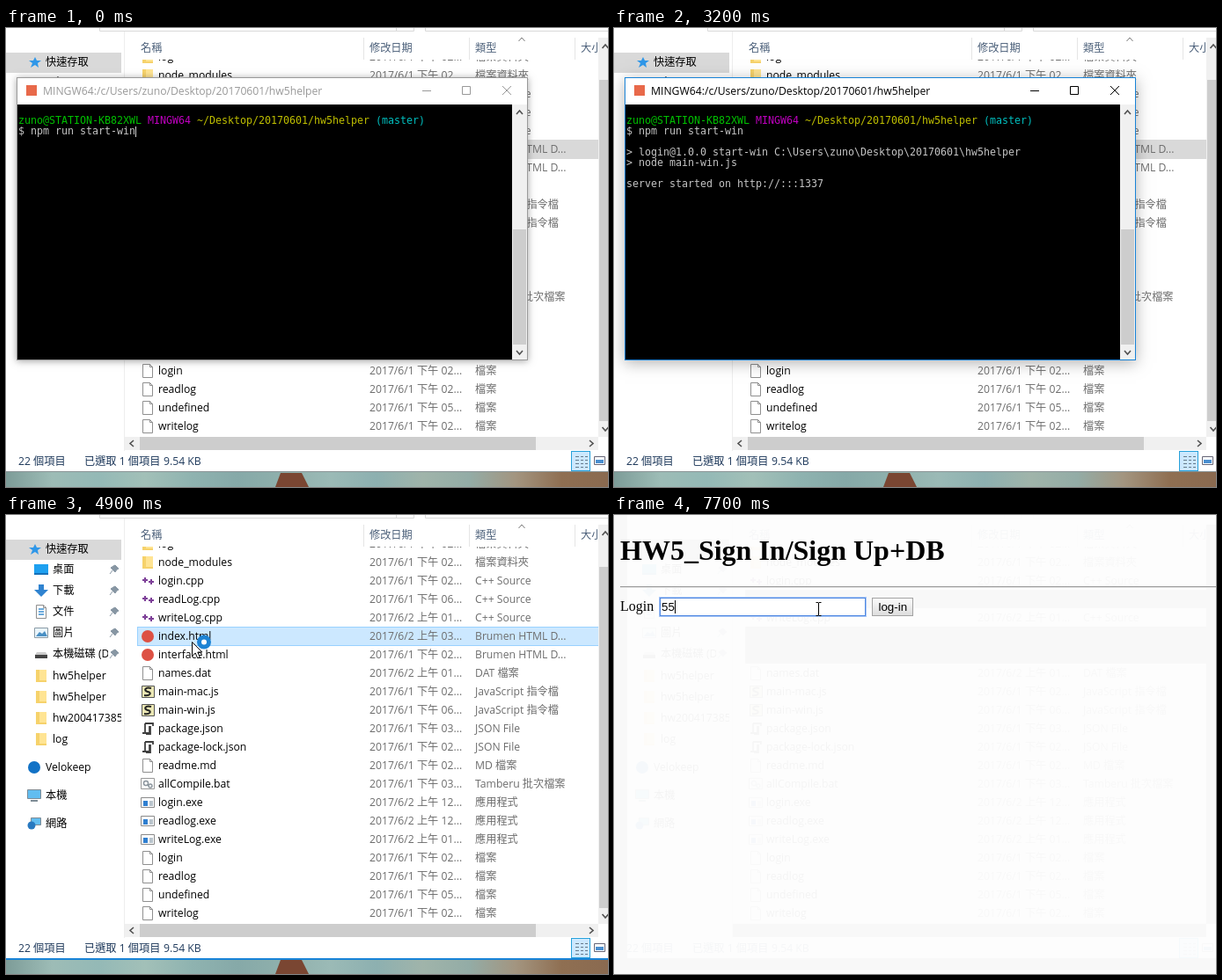
An HTML page with a canvas that plays this animation: 684x522 px, repeating every 8000 ms.

```html
<!DOCTYPE html>
<html lang="zh-Hant">
<head>
<meta charset="utf-8">
<style>
html, body { margin: 0; width: 100%; height: 100%; overflow: hidden; background: #fff; }
canvas { display: block; }
</style>
</head>
<body>
<canvas id="stage" width="684" height="522"></canvas>
<script>
const ctx = document.getElementById('stage').getContext('2d');
const LOOP = 8000, W = 684, H = 522;
const UI = '12.2px "Open Sans", "Noto Sans CJK TC", sans-serif';
const MONO = '11.63px "DejaVu Sans Mono", monospace';
const SANS = '13.33px "Liberation Sans", sans-serif';

const TYPES = {
  dir: '檔案資料夾', cpp: 'C++ Source', html: 'Brumen HTML D...', dat: 'DAT 檔案',
  js: 'JavaScript 指令檔', json: 'JSON File', md: 'MD 檔案',
  bat: 'Tamberu 批次檔案', exe: '應用程式', file: '檔案'
};
// name, a(m) or p(m) with the hour, type
const FILES = `log p02 dir|node_modules p02 dir|login.cpp p02 cpp|readLog.cpp p06 cpp
|writeLog.cpp a01 cpp|index.html a03 html|interface.html p02 html|names.dat a01 dat
|main-mac.js p02 js|main-win.js p06 js|package.json p03 json|package-lock.json p02 json
|readme.md p02 md|allCompile.bat p03 bat|login.exe a12 exe|readlog.exe a12 exe
|writeLog.exe a01 exe|login p02 file|readlog p02 file|undefined p05 file|writelog p02 file`
  .split('|').map(row => row.trim().split(' '));
const SELECTED = 5;

// time, x, y of the pointer's hot spot
const POINTER = [
  [200, 550, 130], [500, 372, 213], [1700, 372, 213], [1800, 366, 200], [2000, 366, 200],
  [2300, 560, 140], [2600, 640, 10], [2700, 645, -30], [3600, 400, -30], [3700, 400, -10],
  [3800, 352, 55], [3900, 300, 90], [4000, 300, 90], [4100, 270, 108], [4200, 240, 163],
  [4500, 211, 144], [5400, 211, 144], [5800, 396, -2], [5900, 430, -30], [6100, 440, -30],
  [6200, 429, 2], [6500, 232, 107], [LOOP, 232, 107]
];

function rect(color, x, y, w, h) {
  ctx.fillStyle = color;
  ctx.fillRect(x, y, w, h);
}
function frame(color, x, y, w, h) {
  ctx.strokeStyle = color;
  ctx.lineWidth = 1;
  ctx.strokeRect(x + .5, y + .5, w - 1, h - 1);
}
function text(s, x, y, color = '#000', font = UI) {
  ctx.font = font;
  ctx.fillStyle = color;
  ctx.fillText(s, x, y);
}
// SVG path at an offset, filled and/or stroked
function path(d, x, y, fill, stroke, width = 1) {
  ctx.save();
  ctx.translate(x, y);
  const p = new Path2D(d);
  if (fill) { ctx.fillStyle = fill; ctx.fill(p); }
  if (stroke) { ctx.strokeStyle = stroke; ctx.lineWidth = width; ctx.stroke(p); }
  ctx.restore();
}
function disc(color, x, y, r) {
  ctx.fillStyle = color;
  ctx.beginPath();
  ctx.arc(x, y, r, 0, 7);
  ctx.fill();
}
function clipped(x, y, w, h, draw) {
  ctx.save();
  ctx.beginPath();
  ctx.rect(x, y, w, h);
  ctx.clip();
  draw();
  ctx.restore();
}
function gradient(x, y, colors) {
  const g = ctx.createLinearGradient(0, 0, x, y);
  colors.forEach((c, i) => g.addColorStop(i / (colors.length - 1), c));
  return g;
}
function chevron(x, y, dx, dy, color = '#505050', width = 1.6) {
  const d = dx ? `M${-2 * dx} -3.5L${2 * dx} 0L${-2 * dx} 3.5` : `M-3.5 ${-2 * dy}L0 ${2 * dy}L3.5 ${-2 * dy}`;
  path(d, x, y, null, color, width);
}

// Icons are drawn around their centre
const ICONS = {
  dir(x, y) {
    rect('#ffe493', x - 6, y - 7, 12, 14);
    path('M-6 -7h4v12l-4 2zM-2 5h8v2h-12z', x, y, '#f6d26b');
  },
  cpp(x, y) {
    path('M-6 -1h6M-3 -4v6M1 1h6M4 -2v6', x, y, null, '#7d3f98', 2);
  },
  html(x, y) { disc('#dd5144', x, y, 7); },
  file(x, y) {
    path('M-5.5 -7.5h8l3 3v12h-11z M2.5 -7.5v3h3', x, y, '#fff', '#8f8f8f');
  },
  js(x, y) {
    path('M-6.5 -6.5h14v13h-14z', x, y, '#ebe7b4', '#555');
    path('M4 -4C-3 -6 -5 -1 0 0S3 5 -4 4', x, y, null, '#222', 2);
  },
  json(x, y) {
    path('M-3 -6h9v3M-3 -6v11h-3M-6 5h8v-8M-2 6h5v-9', x, y, null, '#3f3f3f', 1.8);
  },
  bat(x, y) {
    path('M-7.5 -6.5h15v12h-15z', x, y, '#fafafa', '#999');
    path('M-4.5 -1a2.5 2.5 0 1 0 5 0a2.5 2.5 0 1 0 -5 0M1 2a2 2 0 1 0 4 0a2 2 0 1 0 -4 0', x, y, null, '#8a949c', 1.4);
  },
  exe(x, y) {
    path('M-7.5 -5.5h15v11h-15z', x, y, '#fff', '#8a8a8a');
    rect('#2f7fd0', x - 5, y - 2, 5, 6);
    rect('#b9c4cc', x + 2, y - 2, 4, 6);
  },
  star(x, y) {
    path('M0 -6L2 -2L7 -2L3 1L4 6L0 3L-5 6L-3 1L-7 -2L-2 -2z', x, y, '#2f97e8');
  },
  desk(x, y) { rect('#1ea0f0', x - 8, y - 6, 16, 10); rect('#1670b8', x - 8, y + 4, 16, 2); },
  down(x, y) { path('M-3 -7h6v6h5l-8 8l-8 -8h5z', x, y, '#2f83d0'); },
  doc(x, y) {
    ICONS.file(x, y);
    path('M-3 -3h6M-3 0h6M-3 3h6', x, y, null, '#3b8fd0', 1.4);
  },
  pic(x, y) {
    path('M-7.5 -5.5h15v11h-15z', x, y, '#eaf5fc', '#8a9aa5');
    path('M-6 4l4 -5l3 2l3 -3l3 6z', x, y, '#4a90c4');
  },
  disk(x, y) { path('M-5 -2h10l2 3h-14z', x, y, '#ccc'); rect('#444', x - 7, y + 1, 14, 4); },
  cloud(x, y) { disc('#1272c6', x, y, 7); },
  pc(x, y) {
    path('M-7.5 -6.5h15v10h-15z', x, y, '#62bdf0', '#7d8b95');
    rect('#7d8b95', x - 4, y + 5, 8, 2);
  },
  net(x, y) {
    path('M-3.5 -6.5h11v8h-11z', x, y, '#62bdf0', '#7d8b95');
    disc('#2879c0', x - 3, y + 2, 4.5);
  }
};
ICONS.dat = ICONS.md = ICONS.file;

const SIDEBAR = [
  ['desk', '桌面', 62], ['down', '下載', 86], ['doc', '文件', 110], ['pic', '圖片', 134],
  ['disk', '本機磁碟 (D', 158], ['dir', 'hw5helper', 183], ['dir', 'hw5helper', 207],
  ['dir', 'hw200417385', 231], ['dir', 'log', 255]
];
const PLACES = [['cloud', 'Velokeep', 287], ['pc', '本機', 319], ['net', '網路', 351]];

function sidebar() {
  rect('#d9d9d9', 0, 28, 131, 23);
  ICONS.star(33, 39);
  text('快速存取', 45, 43);
  SIDEBAR.forEach(([icon, label, y], i) => {
    ICONS[icon](40, y);
    text(label, 53, y + 4);
    if (i < 5) {
      rect('#fff', 116, y - 8, 15, 16);
      path('M1 -5l4 4l-2 1l-2 3l-5 -5l3 -2zM-2 1l-3 4', 123, y, '#8796a3', '#8796a3');
    }
  });
  for (const [icon, label, y] of PLACES) {
    ICONS[icon](32, y);
    text(label, 45, y + 4);
  }
}

// Rows run on past the right edge of the view
function fileList(focused, hover) {
  FILES.forEach(([name, when, type], i) => {
    const y = 33 + i * 21, am = when[0] === 'a';
    if (i === SELECTED) {
      rect(focused ? '#cce8ff' : '#d9d9d9', 149, y - 11, 600, 22);
      if (focused) frame('#99d1ff', 149, y - 11, 600, 22);
    } else if (i === hover) rect('#e5f3ff', 149, y - 10, 600, 21);
    ICONS[type](161, y);
    text(name, 173, y + 4);
    text(`2017/6/${am ? 2 : 1} ${am ? '上午' : '下午'} ${when.slice(1)}...`, 413, y + 4, '#6d6d6d');
    text(TYPES[type], 533, y + 4, '#6d6d6d');
  });
}

function wallpaper() {
  rect(gradient(W, 0, ['#7d9c98', '#9dbcb6', '#94b9b6', '#a2c0b8', '#8fb3b0', '#86a9a8', '#8fb0ac',
    '#9bbab6', '#8db0b0', '#a0b4aa', '#93aca6', '#a39580', '#8f6f52', '#8a6a50']), 0, 504, W, 18);
  path('M312 506h24l8 16h-38z', 0, 0, '#7a4632');
}

function explorer(focused, hover) {
  rect('#fff', 0, 0, W, H);
  path('M106.5 0v3.5h357V0M443.5 0v3M476.5 0v3.5H684', 0, 0, null, '#d9d9d9');
  clipped(0, 0, 131, 480, sidebar);
  rect('#ededed', 134, 4, 1, 477);
  clipped(135, 36, 538, 429, () => fileList(focused, hover));
  clipped(135, 4, 537, 32, () => {
    [['名稱', 153], ['修改日期', 413], ['類型', 533], ['大小', 653]]
      .forEach(([s, x]) => text(s, x, 27, '#4c607a'));
  });
  for (const x of [406, 526, 646]) rect('#e5e5e5', x, 11, 1, 25);
  chevron(586, 13, 0, -1, '#777', 1);

  rect('#f0f0f0', 673, 11, 11, 454);
  rect('#cdcdcd', 674, 59, 10, 388);
  chevron(681, 21, 0, -1);
  chevron(681, 456, 0, 1);
  rect('#f0f0f0', 135, 465, 538, 15);
  rect('#cdcdcd', 152, 465, 450, 15);
  chevron(143, 472.5, -1, 0);
  chevron(665, 472.5, 1, 0);

  text('22 個項目', 14, 497, '#1e395b');
  text('已選取 1 個項目', 89, 497, '#1e395b');
  text('9.54 KB', 179, 497, '#1e395b');
  rect('#cce8ff', 642, 481, 22, 23);
  frame('#26a0da', 642, 481, 22, 23);
  for (const y of [487, 491, 495, 499]) {
    path('M647 .5h4M653 .5h3M658 .5h3', 0, y, null, '#65798a');
  }
  path('M668.5 487.5h12v9h-12z', 0, 0, '#fff', '#667');
  rect('#4a8fd0', 670, 491, 9, 4);
  wallpaper();
  rect(focused ? '#1883d7' : '#8a9496', 0, 504, W, focused ? 2 : 1);
}

function terminal(t) {
  const active = t >= 700, ink = active ? '#000' : '#999';
  ctx.save();
  ctx.shadowColor = active ? 'rgba(0,0,0,.3)' : 'rgba(0,0,0,.35)';
  ctx.shadowBlur = active ? 16 : 8;
  ctx.shadowOffsetY = active ? 3 : 1;
  rect('#fff', 12, 56, 581, 322);
  ctx.restore();
  rect('#000', 13, 87, 562, 290);
  rect('#f0f0f0', 575, 87, 17, 290);
  rect('#cdcdcd', 576, 229, 15, 131);
  chevron(583.5, 96, 0, -1);
  chevron(583.5, 369, 0, 1);
  frame(active ? '#1883d7' : '#9a9a9a', 12, 56, 581, 322);
  rect('#e8694a', 23, 65, 12, 12);
  text('MINGW64:/c/Users/zuno/Desktop/20170601/hw5helper', 42, 76, ink);
  path('M473 71.5h10M518.5 66.5h9v9h-9zM564 66l10 10M574 66l-10 10', 0, 0, null, ink);

  const cell = (s, col, row, color = '#c4c4c4') => text(s, 14 + col * 7, 109 + row * 12, color, MONO);
  cell('zuno@STATION-KB82XWL', 0, 0, '#00c000');
  cell('MINGW64', 21, 0, '#bf00bf');
  cell('~/Desktop/20170601/hw5helper', 29, 0, '#bfbf00');
  cell('(master)', 58, 0, '#00bfbf');
  cell('$ npm run start-win', 0, 1);
  if (t >= 2100) {
    cell('> login@1.0.0 start-win C:\\Users\\zuno\\Desktop\\20170601\\hw5helper', 0, 3);
    cell('> node main-win.js', 0, 4);
  }
  if (t >= 2500) cell('server started on http://:::1337', 0, 6);

  const caretOn = t < 1600 || (t >= 2100 && t < 3200) || t >= 3700;
  const caretRow = t < 1200 ? 1 : t < 2100 ? 2 : t < 2500 ? 6 : 7;
  if (caretOn) rect('#d0d0d0', t < 1200 ? 147 : 14, 100 + caretRow * 12, 1, 12);
}

function minimising(t) {
  const k = (t - 3600) / 300;
  ctx.save();
  ctx.globalAlpha = 1 - k;
  ctx.translate(303, 540);
  ctx.scale(1 - .4 * k, 1 - .4 * k);
  ctx.translate(-303, -540 + 120 * k);
  terminal(t);
  ctx.restore();
}

// The browser window fades in and grows; a faint trace of the desktop remains
function browser(t) {
  const step = Math.min(3, (t - 5300) / 100);
  const left = [40, 14, 0, 0][step];
  ctx.save();
  ctx.globalAlpha = [.2, .43, .8, .965][step];
  rect('#fdfdfd', left, 0, W, H);
  ctx.restore();
  if (left) rect('rgba(120,185,240,.7)', left, 0, 1, H);
  if (step === 3) {
    for (const r of [[0, 0, 15, H], [15, 504, 669, 18], [15, 28, 116, 23], [149, 85, 524, 21],
      [149, 127, 524, 42], [135, 465, 538, 15], [673, 11, 11, 454]]) rect('#f8f8f8', ...r);
  }
  if (t < 5900) {
    if (!left) rect('#a5a5a5', 0, 0, W, 1);
  } else page(t);
}

function page(t) {
  const focused = t >= 6700, typed = '55'.slice(0, t < 7600 ? 0 : t < 7700 ? 1 : 2);
  text('HW5_Sign In/Sign Up+DB', 7, 51, '#000', 'bold 32px "Liberation Serif", serif');
  rect('#9a9a9a', 7, 81, W, 1);
  rect('#e4e4e4', 7, 82, W, 1);
  text('Login', 7, 109, '#000', '16px "Liberation Serif", serif');
  rect('#fff', 52, 94, 234, 21);
  if (focused) {
    frame('#a9c7f7', 51, 93, 236, 23);
    frame('#4d86e0', 52, 94, 234, 21);
  } else {
    frame('#a9a9a9', 52, 94, 234, 21);
    frame('#e3e3e3', 53, 95, 232, 19);
  }
  text(typed, 54, 109, '#000', SANS);
  if (focused && (t < 7200 || typed)) rect('#000', 54 + Math.round(typed.length * 7.41), 97, 1, 15);
  rect(gradient(0, 115, ['#fff', '#fff', '#fff', '#fff', '#fff', '#dcdcdc']), 293, 94, 47, 21);
  frame('#a3a3a3', 293, 94, 47, 21);
  text('log-in', 300.5, 109, '#000', SANS);
}

function pointerAt(t) {
  if (t < 200 || (t >= 1100 && t < 1800)) return null;
  const i = POINTER.findIndex(p => p[0] > t);
  const [t0, x0, y0] = POINTER[i - 1], [t1, x1, y1] = POINTER[i];
  const k = (t - t0) / (t1 - t0);
  return [x0 + (x1 - x0) * k, y0 + (y1 - y0) * k];
}

const inside = ([x, y], l, t, r, b) => x > l && x < r && y > t && y < b;

function drawPointer(p, t) {
  const inTerminal = t < 3700 && inside(p, 13, 87, 575, 377);
  const inField = t >= 5900 && inside(p, 52, 94, 286, 115);
  if (inTerminal || inField) {
    path('M-3 -7.5h2.5l.5 .5l.5 -.5h2.5M0 -7V7M-3 7.5h2.5l.5 -.5l.5 .5h2.5', Math.round(p[0]) + .5, p[1], null,
      inTerminal ? '#ddd' : '#000');
    return;
  }
  path('M.5 .5v16l3.7 -3.5l2.5 5.8l2.6 -1.1l-2.5 -5.7h5z', p[0], p[1], '#fff', '#000');
  if (t >= 4900 && t < 5900) {
    path('M-5.5 0a5.5 5.5 0 1 0 11 0a5.5 5.5 0 1 0 -11 0', p[0] + 14, p[1] + .5, '#fff', '#1e84d4', 5);
  }
}

function draw(t) {
  const pointer = pointerAt(t);
  const overList = pointer && t < 5300 && inside(pointer, 149, 36, 673, 465) &&
    !(t < 3700 && inside(pointer, 12, 56, 593, 378));
  explorer(t >= 3700 && t < 5300, overList ? Math.floor((pointer[1] - 22) / 21) : -1);
  if (t < 3700) terminal(t);
  else if (t < 3900) minimising(t);
  if (t >= 5300) browser(t);
  if (pointer) drawPointer(pointer, t);
}

function tick() {
  draw(Math.floor(performance.now() % LOOP / 100) * 100);
  requestAnimationFrame(tick);
}
tick();
</script>
</body>
</html>
```
